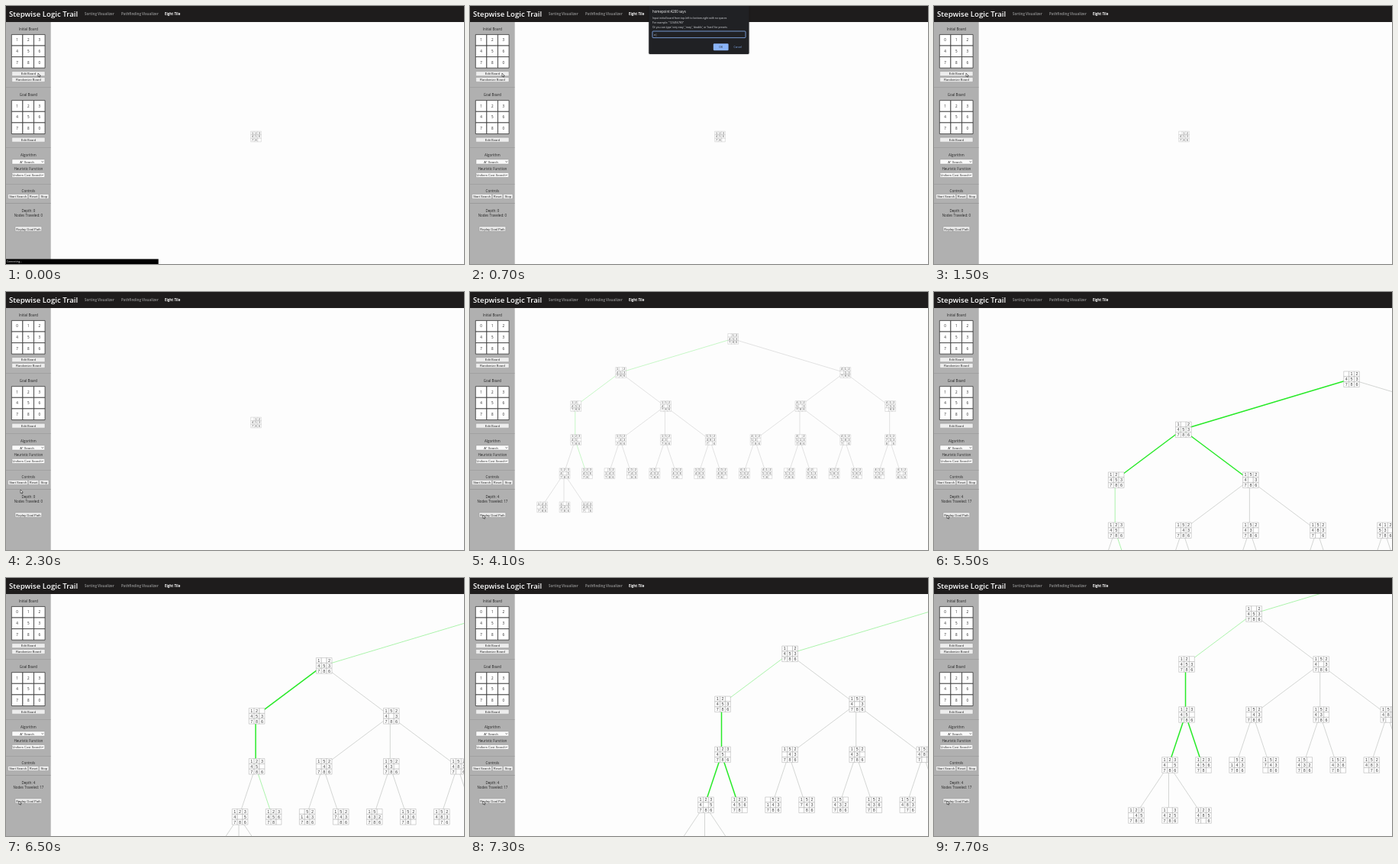
An HTML page with a canvas that plays this animation: 600 by 338 pixels, repeating every 8 s.

```html
<!DOCTYPE html>
<html lang="en">
<head>
<meta charset="utf-8">
<title>Eight Tile</title>
<style>
  html, body { margin: 0; width: 100%; height: 100%; overflow: hidden; background: #fdfdfd; }
  canvas { display: block; }
</style>
</head>
<body>
<canvas id="stage" width="600" height="338"></canvas>
<script>
const ctx = document.getElementById('stage').getContext('2d');
const LOOP = 8000;
const UI = '"Open Sans", sans-serif';
const ARIAL = '"Liberation Sans", Arial, sans-serif';
const START = '012453786', GOAL = '123456780';
const GAP = 29.37;

const clamp = p => Math.max(0, Math.min(1, p));
const mix = (a, b, p) => a + (b - a) * p;
const easeInOut = p => p < 0.5 ? 2 * p * p : 1 - 2 * (1 - p) ** 2;

// Search tree
const nodes = [];
let leaves = 0;

function successors(board) {
  const i = board.indexOf('0'), col = i % 3, out = [];
  const slide = j => {
    const cells = [...board];
    [cells[i], cells[j]] = [cells[j], cells[i]];
    out.push(cells.join(''));
  };
  if (col > 0) slide(i - 1);
  if (col < 2) slide(i + 1);
  if (i > 2) slide(i - 3);
  if (i < 6) slide(i + 3);
  return out;
}

function grow(board, parent, depth, x) {
  const node = { board, parent, depth, x, y: 61 + 44 * depth };
  nodes.push(node);
  const expandable = depth < 4 || (depth === 4 && leaves === 0);
  if (depth === 4) node.x = 124.5 + GAP * leaves++;
  if (!expandable) return node;
  const kids = successors(board)
    .filter(b => !parent || b !== parent.board)
    .map((b, k) => grow(b, node, depth + 1, node.x + (k - 1) * GAP));
  if (depth < 4) node.x = (kids[0].x + kids[kids.length - 1].x) / 2;
  return node;
}

grow(START, null, 0, 0);
const path = [];
for (let n = nodes.find(n => n.board === GOAL); n; n = n.parent) path.unshift(n);

const selectTimes = [4150, 5000, 6000, 7000];
const focusTimes = [4080, 5050, 6060, 7140];

// Drawing helpers
function text(str, x, y, size, { color = '#222', align = 'center', font = UI, weight = 400 } = {}) {
  ctx.save();
  ctx.translate(x, y);
  ctx.scale(0.1, 0.1); // lay out large so small type keeps fractional advances
  ctx.font = `${weight} ${size * 10}px ${font}`;
  ctx.fillStyle = color;
  ctx.textAlign = align;
  ctx.fillText(str, 0, 0);
  ctx.restore();
}

function box(x, y, w, h, fill, stroke, radius = 0, line = 0.5) {
  ctx.beginPath();
  ctx.roundRect(x, y, w, h, radius);
  ctx.fillStyle = fill;
  ctx.fill();
  if (!stroke) return;
  ctx.strokeStyle = stroke;
  ctx.lineWidth = line;
  ctx.stroke();
}

function grid(board, cx, cy, cell, { line, color, size, font, ink, zero = '' }) {
  const left = cx - cell * 1.5, top = cy - cell * 1.5;
  [...board].forEach((digit, i) => {
    const x = left + cell * (i % 3), y = top + cell * Math.floor(i / 3);
    box(x, y, cell, cell, '#fff', color, 0, line);
    text(digit === '0' ? zero : digit, x + cell / 2, y + cell / 2 + size * 0.36, size, { font, color: ink });
  });
}

const tile = (board, x, y) =>
  grid(board, x, y, 4.57, { line: 0.32, color: '#a4a4a4', size: 3.6, font: ARIAL, ink: '#3c3c3c' });

const panelBoard = (board, y) =>
  grid(board, 29.2, y, 14.6, { line: 0.8, color: '#333', size: 4.6, font: UI, zero: '0' });

function button(label, x, y, w) {
  box(x, y, w, 6, '#ededed', '#8a8a8a', 0.8, 0.4);
  text(label, x + w / 2, y + 4.5, 4.1, { font: ARIAL, color: '#2a2a2a' });
}

function select(label, y) {
  box(8, y, 42.7, 6, '#fafafa', '#8a8a8a', 0.5, 0.4);
  text(label, 27.5, y + 4.5, 4.1, { font: ARIAL, color: '#2a2a2a' });
  ctx.beginPath();
  ctx.moveTo(46.6, y + 2.3);
  ctx.lineTo(47.8, y + 3.6);
  ctx.lineTo(49, y + 2.3);
  ctx.strokeStyle = '#222';
  ctx.lineWidth = 0.6;
  ctx.stroke();
}

// Scene parts
function drawTree(t) {
  let scale = 1, dx = 0, dy = 0;
  focusTimes.forEach((start, i) => {
    const p = easeInOut(clamp((t - start) / 500));
    scale = mix(scale, 1.5, p);
    dx = mix(dx, 331 - 1.5 * path[i].x, p);
    dy = mix(dy, 179 - 1.5 * path[i].y, p);
  });
  const selected = path[selectTimes.filter(s => s <= t).length - 1];

  ctx.save();
  ctx.translate(dx, dy);
  ctx.scale(scale, scale);
  for (const n of nodes.slice(1)) {
    const hot = selected && (n === selected || n.parent === selected);
    const solved = path.includes(n) && (n.depth < 3 || t >= 3000);
    ctx.strokeStyle = hot ? '#28ea28' : solved ? '#90f090' : '#b4b6b4';
    ctx.lineWidth = hot ? 1 : solved ? 0.5 : 0.38;
    ctx.beginPath();
    ctx.moveTo(n.parent.x - 1, n.parent.y); // edges meet slightly left of the tile centres
    ctx.lineTo(n.x - 1, n.y);
    ctx.stroke();
  }
  for (const n of nodes) tile(n.board, n.x, n.y);
  ctx.restore();
}

function drawHeader() {
  box(0, 0, 600, 21, '#1e1c1c');
  text('Stepwise Logic Trail', 4, 14, 9.65, { color: '#fff', align: 'left', weight: 600 });
  const link = (label, x, color) => text(label, x, 12.4, 4.45, { color, align: 'left', weight: 700 });
  link('Sorting Visualizer', 103, '#858585');
  link('Pathfinding Visualizer', 151, '#858585');
  link('Eight Tile', 208, '#fff');
}

function drawPanel(board, searched) {
  box(0, 21, 58.7, 317, '#b0b0b0');
  for (const y of [106.5, 185.5, 233, 258.3]) box(0, y, 58.7, 0.6, '#949494');
  const label = (str, y) => text(str, 29.4, y, 4.5);

  label('Initial Board', 31.8);
  panelBoard(board, 59.3);
  button('Edit Board', 7.7, 85.7, 43.3);
  button('Randomize Board', 7.7, 93.4, 43.3);

  label('Goal Board', 118.2);
  panelBoard(GOAL, 145.6);
  button('Edit Board', 7.7, 172.2, 43.3);

  label('Algorithm', 197.2);
  select('A* Search', 201);
  label('Heuristic Function', 214.7);
  select('Uniform Cost Search', 218.5);

  label('Controls', 244.3);
  button('Start Search', 2.6, 246.4, 26);
  button('Reset', 29.4, 246.4, 13.4);
  button('Stop', 43.6, 246.4, 12.4);

  label(`Depth: ${searched ? 4 : 0}`, 269.8);
  label(`Nodes Traveled: ${searched ? 17 : 0}`, 276);
  button('Replay Goal Path', 12, 289, 34.8);
}

function drawPrompt(t) {
  const alpha = clamp((t - 250) / 200) * clamp((1380 - t) / 120);
  if (!alpha) return;
  const typed = 'easy'.slice(0, [700, 900, 1000, 1100].filter(s => s <= t).length);
  const left = { align: 'left', color: '#dfe1e5' };
  ctx.save();
  ctx.globalAlpha = alpha;
  ctx.shadowColor = 'rgba(0,0,0,.4)';
  ctx.shadowBlur = 2;
  box(234.3, -3, 131.2, 66, '#202124', null, 1.5);
  ctx.shadowColor = 'transparent';
  text('homepoint:4200 says', 239, 8.6, 4.4, { ...left, color: '#fff' });
  text('Input initial board from top-left to bottom-right with no spaces', 239, 17.3, 3.35, left);
  text('For example: "123456780"', 239, 23, 3.35, left);
  text("Or you can type 'very easy', 'easy', 'doable', or 'hard' for presets", 239, 28.8, 3.35, left);
  box(239, 33, 122, 8.6, '#202124', '#8ab4f8', 1, 0.8);
  text(typed + '|', 241, 38.6, 3.6, left);
  box(318.8, 49.2, 19.8, 9, '#8ab4f8', null, 1.2);
  text('OK', 328.7, 55, 3.4, { color: '#202124' });
  text('Cancel', 350.8, 55, 3.4, { color: '#8ab4f8' });
  ctx.restore();
}

function drawStatus() {
  box(0, 331.6, 199.7, 7, '#000');
  text('Connecting...', 1, 336, 3.3, { color: '#fff', align: 'left' });
}

const cursorKeys = [
  [1800, 42, 88], [2050, 33, 160], [2300, 19, 259], [2480, 7, 268],
  [2700, 12, 249], [3000, 17, 250], [3400, 17, 251], [3950, 17, 292]
];

function drawCursor(t) {
  let [, x, y] = cursorKeys[0];
  for (let i = 1; i < cursorKeys.length; i++) {
    const [from] = cursorKeys[i - 1], [to, kx, ky] = cursorKeys[i];
    const p = easeInOut(clamp((t - from) / (to - from)));
    x = mix(x, kx, p);
    y = mix(y, ky, p);
  }
  ctx.save();
  ctx.translate(x, y);
  ctx.beginPath();
  for (const [px, py] of [[0, 0], [0, 4.6], [1.1, 3.7], [1.9, 5.3], [2.6, 5], [1.9, 3.4], [3.3, 3.3]])
    ctx.lineTo(px, py);
  ctx.closePath();
  ctx.fillStyle = '#fff';
  ctx.strokeStyle = '#222';
  ctx.lineWidth = 0.6;
  ctx.fill();
  ctx.stroke();
  ctx.restore();
}

function draw(t) {
  const board = t < 1300 ? GOAL : START;
  const searched = t >= 2800;
  box(0, 0, 600, 338, '#fdfdfd');
  if (searched) drawTree(t);
  else tile(board, 327.5, 171);
  drawHeader();
  drawPanel(board, searched);
  drawPrompt(t);
  if (t < 200) drawStatus();
  drawCursor(t);
}

const began = performance.now();
function tick() {
  draw((performance.now() - began) % LOOP);
  requestAnimationFrame(tick);
}
tick();
</script>
</body>
</html>
```
